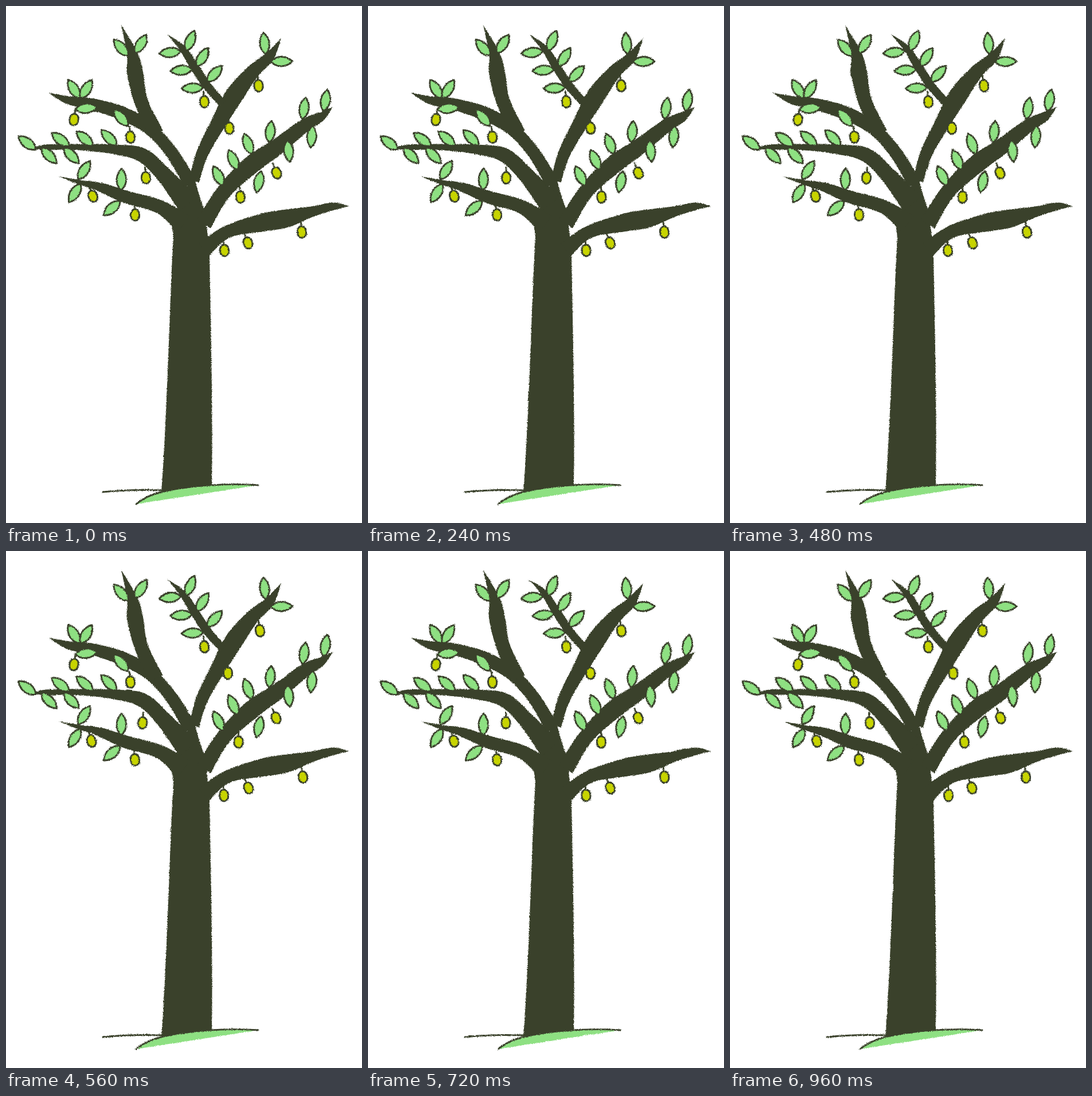
These frames come from a looping animation (621x901 px, 1 s). An HTML page:

```html
<!DOCTYPE html>
<html lang="en">
<head>
<meta charset="utf-8">
<title>Fruit tree</title>
<style>
  html, body { margin: 0; width: 100%; height: 100%; overflow: hidden; background: #fff; }
  svg { display: block; width: 100%; height: 100%; }
  .wood { fill: #3a412b; }
  .leaf, .fruit, .line { stroke: #3a412b; stroke-width: 2.9; stroke-linecap: round; stroke-linejoin: round; }
  .leaf, .grass { fill: #8ee082; }
  .fruit { fill: #c7d400; }
  .line { fill: none; }
</style>
</head>
<body>
<svg viewBox="0 0 621 901">
  <filter id="rough" filterUnits="userSpaceOnUse" x="0" y="0" width="621" height="901" color-interpolation-filters="sRGB">
    <feTurbulence type="fractalNoise" baseFrequency=".7" result="grain"/>
    <feDisplacementMap in="SourceGraphic" in2="grain" scale="4" xChannelSelector="R" yChannelSelector="G" result="fuzzy"/>
    <feTurbulence type="fractalNoise" baseFrequency=".03" result="wave"/>
    <feDisplacementMap in="fuzzy" in2="wave" scale="2" xChannelSelector="R" yChannelSelector="G"/>
  </filter>
  <g id="tree" filter="url(#rough)">
    <path class="grass" d="M227 868Q245 853 275 846C320 836 380 831 440 835Z"/>
    <path class="wood" d="M271 846C281 720 286 500 292 402L289 381 300 357 326 288Q333 320 346 356L352 400 355 432C357 560 361 690 359 835Q315 837 271 846Z"/>
    <path class="line" d="M227 868Q245 853 275 846C320 836 380 831 440 835M169 847Q215 842 271 844"/>
  </g>
</svg>
<script>
const tree = document.getElementById('tree');
const noises = document.querySelectorAll('feTurbulence');

function add(parent, tag, attrs) {
  const el = document.createElementNS('http://www.w3.org/2000/svg', tag);
  for (const key in attrs) el.setAttribute(key, attrs[key]);
  parent.append(el);
  return el;
}

// Smooth curve through the points
function curve(pts) {
  let d = '';
  for (let i = 0; i < pts.length - 1; i++) {
    const a = pts[i - 1] || pts[i], b = pts[i], c = pts[i + 1], e = pts[i + 2] || c;
    d += `C${b.map((v, k) => v + (c[k] - a[k]) / 6)} ${c.map((v, k) => v - (e[k] - b[k]) / 6)} ${c}`;
  }
  return d;
}

// Spine points [x, y, half width] from the base to the tip
function limb(...spine) {
  const edge = side => spine.map(([x, y, r], i) => {
    const a = spine[i - 1] || spine[i], b = spine[i + 1] || spine[i];
    const dx = b[0] - a[0], dy = b[1] - a[1], k = side * r / Math.hypot(dx, dy);
    return [x - dy * k, y + dx * k];
  });
  const left = edge(-1), right = edge(1).reverse();
  add(tree, 'path', { class: 'wood', d: `M${left[0]}${curve(left)}${curve(right)}Z` });
}

// Left side, low to high
limb([310, 380, 18], [268, 350, 12], [210, 333, 11], [165, 316, 8], [128, 307, 4], [92, 297, 0]);
limb([318, 345, 20], [277, 296, 14], [238, 260, 12.5], [190, 250, 8.5], [130, 246, 5.5], [70, 246, 4.5], [38, 249, 0]);
limb([322, 310, 12], [290, 257, 11], [252, 215, 11], [205, 188, 12], [150, 171, 10], [108, 164, 7], [74, 151, 0]);
limb([262, 222, 13], [236, 167, 12], [225, 116, 14], [220, 82, 9], [201, 33, 0]);
// Right side, high to low
limb([328, 305, 9], [342, 258, 10.5], [370, 205, 13], [398, 156, 16], [430, 115, 12], [460, 88, 8.5], [480, 56, 0]);
limb([378, 170, 7], [350, 138, 7.5], [327, 103, 7.5], [307, 73, 5.5], [281, 49, 0]);
limb([345, 380, 14], [380, 324, 13], [428, 277, 16], [475, 244, 14], [520, 209, 11.5], [550, 192, 8], [570, 176, 0]);
limb([345, 425, 14], [385, 394, 11], [445, 378, 15.5], [490, 370, 15.5], [535, 358, 9], [572, 349, 6.5], [598, 349, 0]);

// Row of n leaves; position and angle run evenly from one [x, y, angle] to the other
function leaves(n, from, to) {
  for (let i = 0; i < n; i++) {
    const [x, y, turn] = from.map((v, k) => i ? v + (to[k] - v) * i / (n - 1) : v);
    add(tree, 'path', {
      class: 'leaf', transform: `translate(${x} ${y}) rotate(${turn})`,
      d: 'M0 0C10 -11 26 -11 38 0C26 11 10 11 0 0Z'
    });
  }
}
leaves(2, [213, 87, -131], [225, 82, -57]);
leaves(3, [305, 79, 174], [344, 142, 177]);
leaves(3, [314, 78, -67], [351, 132, -47]);
leaves(2, [453, 84, -96], [462, 97, -1]);
leaves(2, [128, 161, -121], [130, 161, -58]);
leaves(2, [121, 180, -5], [213, 209, -131]);
leaves(1, [52, 250, -143]);
leaves(3, [110, 244, -143], [193, 243, -135]);
leaves(2, [62, 247, 46], [101, 247, 46]);
leaves(2, [126, 302, -57], [130, 310, 122]);
leaves(2, [201, 321, -89], [199, 340, 139]);
leaves(3, [379, 313, -117], [429, 258, -111]);
leaves(1, [459, 238, -84]);
leaves(2, [517, 197, -81], [554, 183, -80]);
leaves(1, [445, 288, 102]);
leaves(2, [491, 234, 84], [535, 209, 95]);

const fruits = [];
function fruit(x, y, swing = 0, tilt = -5) {
  const el = add(tree, 'g', { class: 'fruit' });
  add(el, 'path', { d: 'M0 -10V-18' });
  add(el, 'rect', { x: -7.5, y: -10, width: 15, height: 20, rx: 7.3, ry: 8.5 });
  fruits.push({ el, x, y, swing, tilt });
}
fruit(118.5, 198, 0, 8);
fruit(217, 228.5);
fruit(244, 299.5, -6);
fruit(151.5, 331.5, -2.5, -20);
fruit(225, 364);
fruit(346, 167);
fruit(440.5, 139, 2.5);
fruit(389.5, 213, -2.5);
fruit(409, 333, -3.5);
fruit(472, 291, -1, -22);
fruit(422, 413, 1, -20);
fruit(381, 426, -1);
fruit(516, 394, 2);

// Redrawn 25 times a second: the outlines tremble, the fruits swing out and back
function draw(now) {
  const step = Math.floor(now % 1000 / 40);
  const k = (1 - Math.cos(step / 25 * 2 * Math.PI)) / 2;
  noises.forEach((noise, i) => noise.setAttribute('seed', step * 2 + i + 1));
  for (const { el, x, y, swing, tilt } of fruits) {
    const dx = swing * k;
    el.setAttribute('transform', `translate(${x + dx} ${y}) rotate(${tilt - dx * 1.5})`);
  }
}

const start = performance.now();
function tick() {
  draw(performance.now() - start);
  requestAnimationFrame(tick);
}
tick();
</script>
</body>
</html>
```
